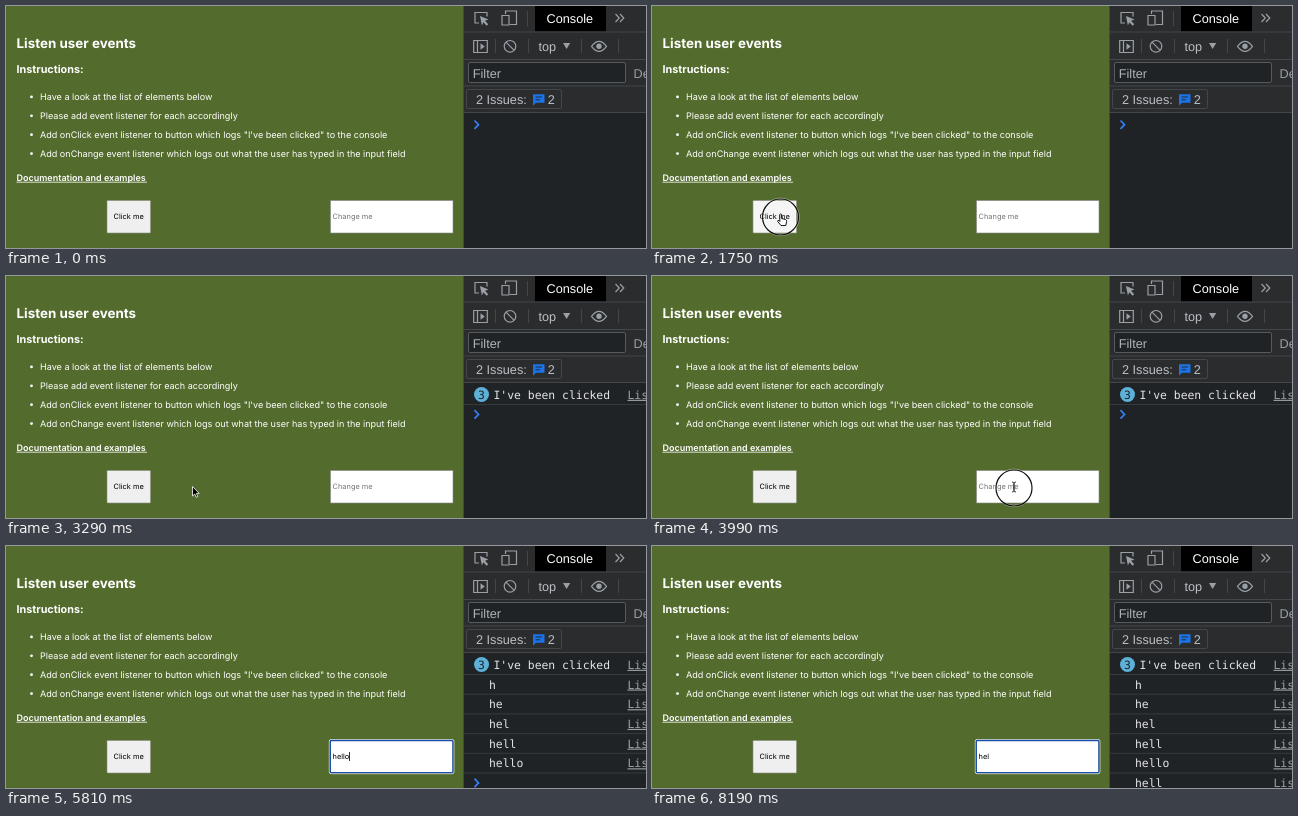
These frames come from a looping animation (640 by 242 pixels, 8.26 s). An HTML page:

```html
<!DOCTYPE html>
<html lang="en">
<head>
<meta charset="utf-8">
<title>Listen user events</title>
<style>
  html, body { margin: 0; width: 100%; height: 100%; overflow: hidden; background: #202124; }
  svg { display: block; width: 640px; height: 242px; }
  text { white-space: pre; text-rendering: geometricPrecision; }
  .page { font-family: Inter, "Open Sans", sans-serif; font-size: 9.06px; fill: #fff; }
  .page .title { font-size: 13.4px; font-weight: 700; }
  .page .subtitle { font-size: 10.8px; font-weight: 700; }
  .page .link { font-weight: 600; font-size: 9px; }
  .page .control { font-size: 7.4px; fill: #000; }
  .page .hint { fill: #757575; }
  .tools { font-family: "Liberation Sans", Arial, sans-serif; font-size: 12.7px; fill: #bdc1c6; }
  .icon { fill: none; stroke: #9aa0a6; stroke-width: 1.2; }
  .rule { fill: none; stroke: #43474a; stroke-width: 1; }
  .log { font-family: "DejaVu Sans Mono", monospace; font-size: 11.4px; fill: #e3e5e8; }
  .log .rule { stroke: #363a3d; }
  .log .source { fill: #9aa0a6; text-decoration: underline; }
</style>
</head>
<body>
<svg viewBox="0 0 640 242" xmlns="http://www.w3.org/2000/svg">
  <rect width="640" height="242" fill="#202325"/>

  <g class="page">
    <rect width="457" height="242" fill="#536b2d"/>
    <text class="title" x="10.5" y="42">Listen user events</text>
    <text class="subtitle" x="10.5" y="67">Instructions:</text>
    <g id="bullets"></g>
    <text class="link" x="10.5" y="174.5">Documentation and examples</text>
    <path d="M10.500 176.200H141" stroke="#fff" stroke-width=".8"/>
    <rect id="button" x="101" y="194.500" width="43.500" height="32.500" rx=".8" stroke="#8b8f80" stroke-width=".6"/>
    <text class="control" x="107.600" y="213.300">Click me</text>
    <rect x="324.500" y="194.500" width="122.500" height="32.500" fill="#fff" stroke="#858585" stroke-width=".6"/>
    <g id="ring" fill="none">
      <rect x="323.300" y="193.500" width="124.600" height="34.200" rx="1.800" stroke="#fff" stroke-width=".8"/>
      <rect x="324.300" y="194.500" width="122.600" height="32.200" rx="1.200" stroke="#1a4fa8" stroke-width="1.300"/>
    </g>
    <text class="control hint" id="hint" x="326.600" y="213.300">Change me</text>
    <text class="control" id="typed" x="326.600" y="213.300"></text>
    <rect id="caret" y="206" width=".8" height="9" fill="#000"/>
  </g>

  <g class="tools">
    <rect x="457" width="183" height="106.500" fill="#2a2c2e"/>
    <rect x="529" width="71" height="25.500" fill="#000"/>
    <path class="rule" d="M457.500 0V242M457 26H640M457 53.500H640M457 80H640M457 106.500H640M521.500 5V20M489.500 33V47M522.500 33V47M575.500 33V47M612.500 33V47"/>
    <text x="540.600" y="16.700" fill="#fff">Console</text>
    <path class="icon" d="M609.500 8l3.800 4-3.800 4M614 8l3.800 4-3.800 4"/>

    <path class="icon" d="M473 17H469V6.500H481V10.500"/>
    <path d="M474 10l8.500 3.400-3.500 1.400 3.200 3.400-1.600 1.500-3.200-3.400-1.500 3.200z" fill="#9aa0a6"/>
    <path class="icon" d="M499.500 8V5H510.500V18.500H504M496 9.500H503V19H496z"/>

    <path class="icon" d="M467.700 34.500H481.300V46.500H467.700zM471.500 34.500V46.500"/>
    <path d="M474.500 37.200v6.600l4.300-3.300z" fill="#9aa0a6"/>
    <circle class="icon" cx="504" cy="40.300" r="5.800"/>
    <path class="icon" d="M500 36.200l8.200 8.200"/>
    <text x="532.500" y="44.500">top</text>
    <path d="M557 37h7.200l-3.600 6z" fill="#9aa0a6"/>
    <path class="icon" d="M585.500 40.300q7.500-10 15 0q-7.500 10-15 0z"/>
    <circle cx="593" cy="40.300" r="2.700" fill="#9aa0a6"/>

    <rect class="rule" x="462.500" y="56.500" width="157" height="20" rx="1.500" style="fill:#202325;stroke:#555a5e"/>
    <text x="466.800" y="71.700" fill="#b0b4b8">Filter</text>
    <text x="627.500" y="71.700" fill="#9aa0a6">Default levels</text>

    <rect class="rule" x="460.500" y="83.500" width="95" height="19" rx="1.500"/>
    <text x="470" y="97.800">2 Issues:</text>
    <path d="M527 88.200h11.500v8.500h-8.500l-3 3z" fill="#1a73e8"/>
    <path d="M529.500 91h6.500M529.500 93.800h4.500" stroke="#2a2c2e" stroke-width="1"/>
    <text x="541.700" y="97.800">2</text>
  </g>

  <g class="log">
    <g id="rows"></g>
    <path id="prompt" d="M468.500 -4l4 4.200-4 4.200" fill="none" stroke="#367cf1" stroke-width="1.800"/>
  </g>

  <g id="mouse">
    <g id="press" fill="none">
      <circle cy="1" r="18" stroke="#fff" stroke-opacity=".5" stroke-width="2.400"/>
      <circle cy="1" r="18" stroke="#111" stroke-width="1.200"/>
    </g>
    <path id="arrow" d="M0 0V9.500L2.200 7.500 3.700 10.800 5.300 10.100 3.900 6.900H6.700z" fill="#000" stroke="#fff" stroke-width=".8"/>
    <path id="hand" d="M-.7 -1.500q1-1.200 1.800 0V2.500l4 1q1.200.4 1 2L5.300 9.500H.5L-2.800 5.500q-.2-1.500 1.200-1L-.7 5.500z" fill="#fff" stroke="#000" stroke-width=".9"/>
    <path id="beam" d="M-2-5q2 0 2 1.500V3.500q0 1.500-2 1.500M2-5q-2 0-2 1.500V3.500q0 1.500 2 1.500" fill="none" stroke="#222" stroke-width=".9"/>
  </g>
</svg>

<script>
const DURATION = 8260;
const ROW_HEIGHT = 19.7;
const FIRST_ROW = 118.5;
const FOCUS_TIME = 4130;

const instructions = [
  "Have a look at the list of elements below",
  "Please add event listener for each accordingly",
  "Add onClick event listener to button which logs \"I've been clicked\" to the console",
  "Add onChange event listener which logs out what the user has typed in the input field"
];

// Mouse down and mouse up times; the first three are on the button.
const presses = [[1610, 1890], [2310, 2450], [2660, 2800], [3990, 4130]];
const clicks = presses.slice(0, 3).map(press => press[1]);

const edits = [
  [4480, "h"], [4690, "he"], [5040, "hel"], [5250, "hell"],
  [5530, "hello"], [6300, "hell"], [6580, "hel"]
];

// Time, x, y
const path = [
  [350, 215, 246], [1120, 128.5, 210], [2800, 128.5, 210],
  [3010, 172, 213], [3290, 186.5, 210.5], [3850, 362, 211],
  [7070, 362, 211], [7770, 352, 250]
];

const $ = id => document.getElementById(id);
const show = (id, on) => { $(id).style.display = on ? "" : "none"; };

function add(parent, tag, attrs, content = "") {
  const node = document.createElementNS("http://www.w3.org/2000/svg", tag);
  for (const name in attrs) node.setAttribute(name, attrs[name]);
  node.textContent = content;
  return parent.appendChild(node);
}

instructions.forEach((line, i) => {
  const y = 93.9 + i * 18.9;
  add($("bullets"), "circle", { cx: 25.5, cy: y - 3, r: 1.4 });
  add($("bullets"), "text", { x: 34, y }, line);
});

function addRow(index, content) {
  const y = FIRST_ROW + index * ROW_HEIGHT;
  const row = add($("rows"), "g", {});
  const label = add(row, "text", { x: 483, y: y + 4.3 }, content);
  add(row, "text", { x: 621.5, y: y + 4.3, class: "source" }, "Listen.js");
  add(row, "path", { d: `M458 ${y + 10}H640`, class: "rule" });
  return { row, label };
}

const clickRow = addRow(0, "I've been clicked");
const badge = add(clickRow.row, "g", {});
add(badge, "circle", { cx: 475.5, cy: FIRST_ROW, r: 7.5, fill: "#5db0d7" });
const count = add(badge, "text", {
  x: 475.5, y: FIRST_ROW + 4.2, "text-anchor": "middle", fill: "#202124"
});
const editRows = edits.map(([, value], i) => addRow(i + 1, value).row);

function mouseAt(t) {
  const next = path.findIndex(point => point[0] > t);
  if (next < 1) return path[next ? path.length - 1 : 0].slice(1);
  const [t0, x0, y0] = path[next - 1];
  const [t1, x1, y1] = path[next];
  const p = (t - t0) / (t1 - t0);
  const eased = p * p * (3 - 2 * p);
  return [x0 + (x1 - x0) * eased, y0 + (y1 - y0) * eased];
}

function drawMouse(t, pressed) {
  const [x, y] = mouseAt(t);
  const inRow = y > 194 && y < 227;
  const overButton = inRow && x > 101 && x < 145;
  const overInput = inRow && x > 324 && x < 447;
  show("mouse", (t >= 350 && t < edits[0][0]) || (t >= 7070 && t < 7770));
  show("press", pressed);
  show("hand", overButton);
  show("beam", overInput);
  show("arrow", !overButton && !overInput);
  $("mouse").setAttribute("transform", `translate(${x} ${y})`);
  $("button").setAttribute("fill", pressed && overButton ? "#f5f5f5" : "#efefef");
}

function drawInput(t, edit) {
  const focused = t >= FOCUS_TIME;
  const lastChange = edit ? edit[0] : FOCUS_TIME;
  $("typed").textContent = edit ? edit[1] : "";
  show("hint", !edit);
  show("ring", focused);
  show("caret", focused && (t - lastChange) % 1000 < 500);
  $("caret").setAttribute("x", 326.4 + (edit ? $("typed").getComputedTextLength() : 0));
}

function drawLog(t, editCount) {
  const clickCount = clicks.filter(time => time <= t).length;
  const repeated = clickCount > 1;
  clickRow.row.style.display = clickCount ? "" : "none";
  clickRow.label.setAttribute("x", repeated ? 487.5 : 483);
  badge.style.display = repeated ? "" : "none";
  count.textContent = clickCount;
  editRows.forEach((row, i) => { row.style.display = i < editCount ? "" : "none"; });
  const used = editCount + (clickCount ? 1 : 0);
  $("prompt").setAttribute("transform", `translate(0 ${FIRST_ROW + used * ROW_HEIGHT})`);
}

function draw() {
  const t = performance.now() % DURATION;
  const done = edits.filter(edit => edit[0] <= t);
  drawMouse(t, presses.some(([down, up]) => t >= down && t < up));
  drawInput(t, done[done.length - 1]);
  drawLog(t, done.length);
  requestAnimationFrame(draw);
}
draw();
</script>
</body>
</html>
```
